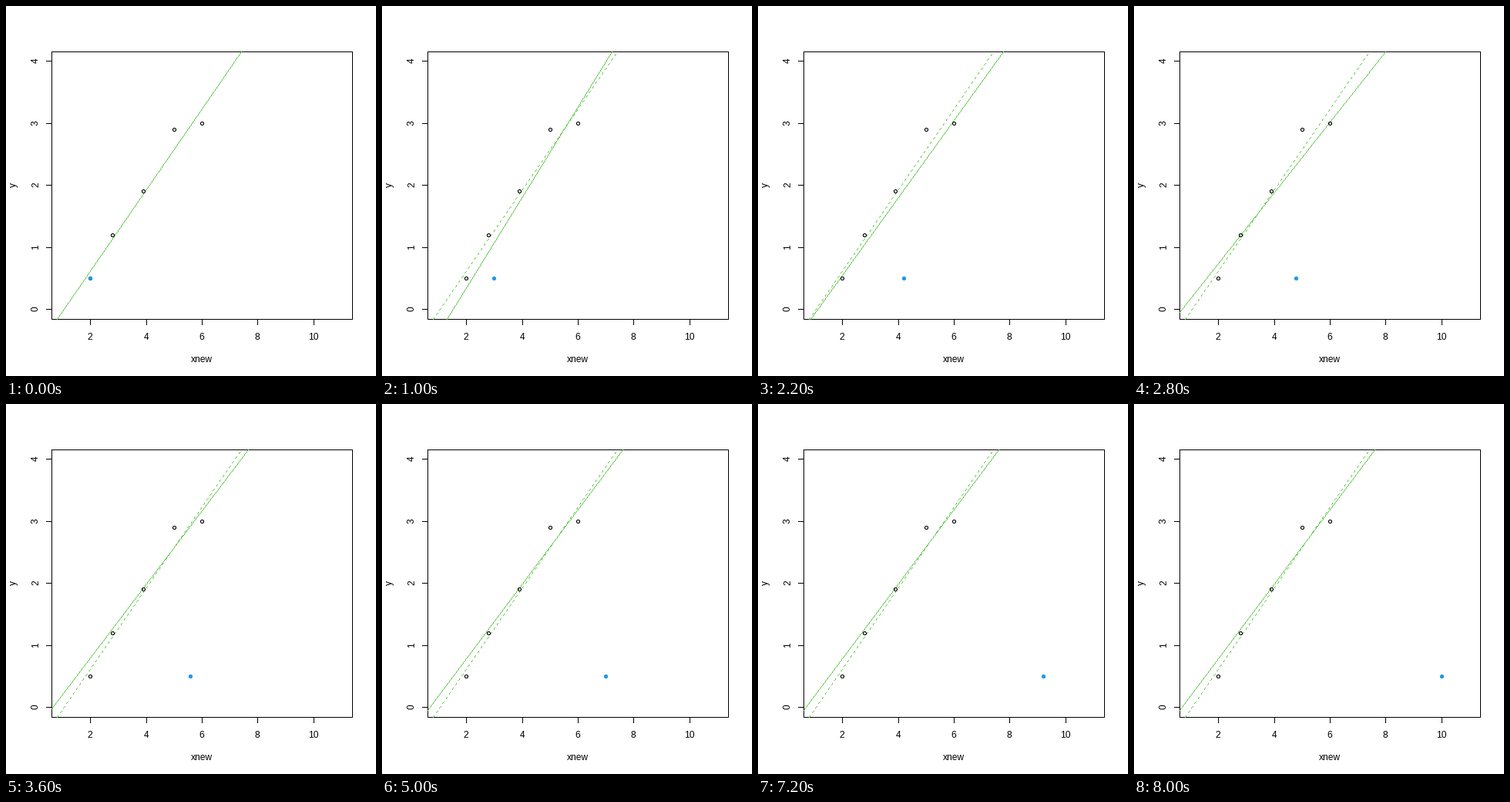
These frames come from a looping animation (480x480 px, 8.2 s). A matplotlib script:

```python
from itertools import combinations

import matplotlib.pyplot as plt
import numpy as np
from matplotlib.animation import FuncAnimation
from matplotlib.collections import LineCollection
from matplotlib.patches import Circle

SIZE, DPI = 480, 80
PX = 72 / DPI                       # points per pixel
LEFT, RIGHT, TOP, BOTTOM = 59.04, 449.76, 59.04, 406.56
X0, X1, Y0, Y1 = 0.6, 11.4, -0.16, 4.16
GREEN, BLUE = "#61C64C", "#2297E6"
FRAMES, STEP = 41, 0.2

XS = np.array([2, 2.8, 3.9, 5, 6])
YS = np.array([0.5, 1.2, 1.9, 2.9, 3.0])


def px(x):
    return LEFT + (x - X0) / (X1 - X0) * (RIGHT - LEFT)


def py(y):
    return BOTTOM - (y - Y0) / (Y1 - Y0) * (BOTTOM - TOP)


def snap(v):
    return np.floor(v) + 0.5


# Robust MM regression with Tukey's bisquare
def weights(u):
    return np.clip(1 - u**2, 0, None) ** 2


def m_scale(r, c=1.548):
    s = np.median(np.abs(r)) / 0.6745 + 0.05
    for _ in range(60):
        rho = 1 - np.clip(1 - (r / (c * s)) ** 2, 0, None) ** 3
        s *= np.sqrt(rho.sum() / (0.5 * (len(r) - 2)))
    return s


def wls(x, y, w):
    mx, my = np.average(x, weights=w), np.average(y, weights=w)
    slope = (w * (x - mx) * (y - my)).sum() / (w * (x - mx) ** 2).sum()
    return my - slope * mx, slope


def s_fit(x, y):
    best = (np.inf, 0, 0)
    for i, j in combinations(range(len(x)), 2):
        if abs(x[i] - x[j]) < 1e-6:
            continue
        b = (y[i] - y[j]) / (x[i] - x[j])
        a = y[i] - b * x[i]
        for _ in range(12):
            r = y - a - b * x
            s = m_scale(r)
            if s < best[0]:
                best = (s, a, b)
            w = weights(r / (1.548 * s))
            if (w > 1e-9).sum() < 3:
                break
            a, b = wls(x, y, w)
    return best


def mm_fit(x, y):
    s, a, b = s_fit(x, y)
    for _ in range(60):
        a, b = wls(x, y, weights((y - a - b * x) / (4.685 * s)))
    return a, b


def moved(x):
    return np.append(x, XS[1:])


FITS = [mm_fit(moved(2 + STEP * i), YS) for i in range(FRAMES)]


def pixel_line(fit, dash=0):
    """One hard-edged pixel per row, optionally in dashes of `dash` rows."""
    a, b = fit
    x = np.array([max(X0, (Y0 - a) / b), min(X1, (Y1 - a) / b)])
    (xa, xb), (ya, yb) = np.floor(px(x)), np.floor(py(a + b * x))
    rows = np.arange(ya, yb - 1, -1)
    if dash:
        rows = rows[np.arange(len(rows)) // dash % 2 == 0]
    cols = np.round(xa + (rows - ya) * (xb - xa) / (yb - ya))
    return [[(c, y + 0.5), (c + 1, y + 0.5)] for c, y in zip(cols, rows)]


fig = plt.figure(figsize=(SIZE / DPI, SIZE / DPI), dpi=DPI, facecolor="white")
ax = fig.add_axes([0, 0, 1, 1])
ax.set_xlim(0, SIZE)
ax.set_ylim(SIZE, 0)
ax.axis("off")


def stroke(xs, ys):
    ax.plot(xs, ys, color="black", lw=PX, snap=False, zorder=2,
            solid_capstyle="projecting", solid_joinstyle="miter")


def label(x, y, s, rotation=0):
    ax.text(x, y, s, fontsize=12 * PX, family="Liberation Sans", ha="center",
            va="baseline", rotation=rotation, rotation_mode="anchor")


def add_line(segments):
    lines = LineCollection(segments, colors=GREEN, linewidths=PX,
                           capstyle="butt", snap=False, zorder=3)
    return ax.add_collection(lines, autolim=False)


l, r, t, b = (snap(v) for v in (LEFT, RIGHT, TOP, BOTTOM))
stroke([l, r, r, l, l], [t, t, b, b, t])
for v in range(2, 11, 2):
    stroke([snap(px(v))] * 2, [b, b + 7])
    label(np.floor(px(v)), 433, str(v))
for v in range(5):
    stroke([l, l - 7], [snap(py(v))] * 2)
    label(42, np.floor(py(v)), str(v), 90)
label(254, 462, "xnew")
label(13, 232, "y", 90)

for x, y in zip(XS, YS):
    ax.add_patch(Circle((snap(px(x)), snap(py(y))), 2.05, fc="none",
                        ec="black", lw=1.1 * PX, zorder=4))

add_line(pixel_line(FITS[0], dash=3))
line = add_line([])
dot = ax.add_patch(Circle((0, 0), 2.65, fc=BLUE, ec="none", zorder=5))


def update(i):
    line.set_segments(pixel_line(FITS[i]))
    dot.center = snap(px(2 + STEP * i)), snap(py(YS[0]))
    return line, dot


anim = FuncAnimation(fig, update, frames=FRAMES, interval=200,
                     init_func=lambda: update(0), repeat=True, repeat_delay=0)
plt.show()
```
